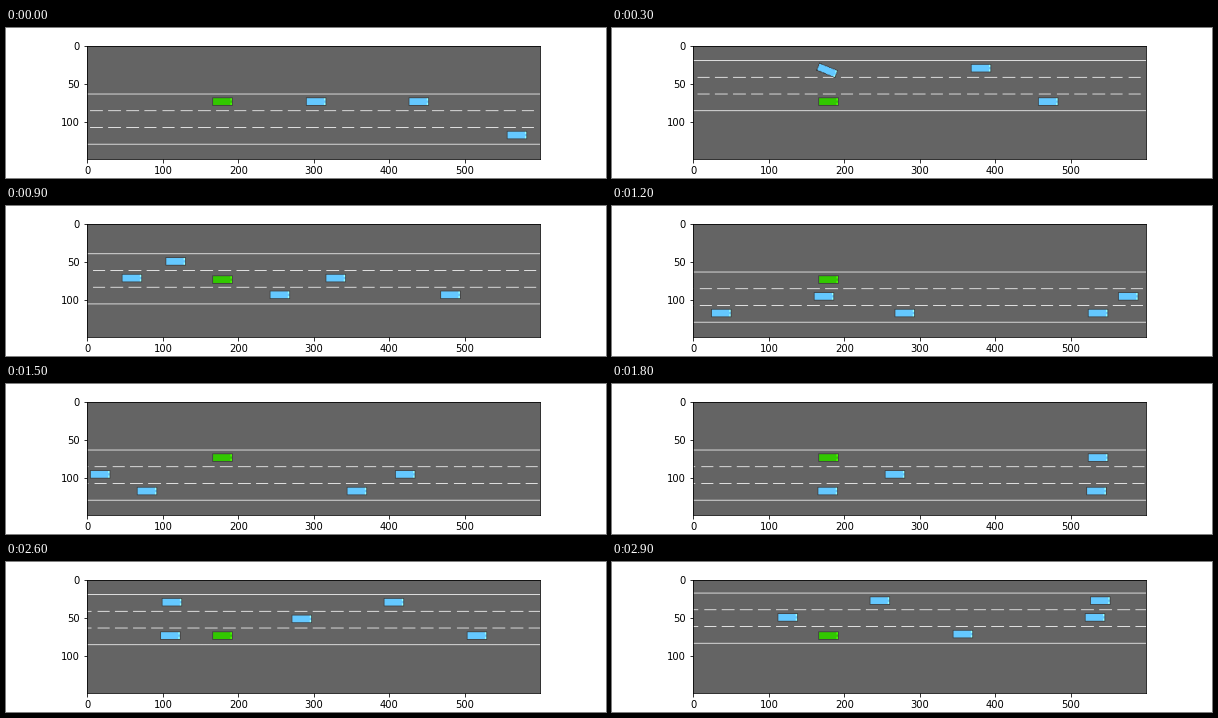
A matplotlib script for the animation above (3000 ms loop, 600 by 150 pixels).

```python
import numpy as np
import matplotlib.pyplot as plt
from matplotlib.animation import FuncAnimation

W, H, DPI = 600, 150, 72
FRAMES, INTERVAL = 30, 100

GREY, WHITE, EDGE = (100, 100, 100), (255, 255, 255), (60, 60, 60)
GREEN, BLUE = (50, 200, 0), (100, 200, 255)

LANE = 22                     # lane width in road pixels
PITCH, DASH, DRIFT = 23.8, 16.5, 0.35
EGO_X, EGO_Y = 180, 75

# Lane changes of the green car: time of the turn, lane it settles in
EGO_TURNS = [(0, 1), (1, 2), (8, 1), (9, 0), (21, 1.05), (25, 2.1)]

gy, gx = np.mgrid[0:H, 0:W] + 0.5


class Car:
    """Traffic that falls back at a steady speed relative to the green car."""

    def __init__(self, lane, t, x, speed=53, before=None, turn=None):
        self.lane, self.t, self.x = lane, t, x
        self.speed = speed
        self.before = speed if before is None else before
        self.turn = turn      # (start time, new lane)

    def pose(self, t):
        dt = t - self.t
        x = self.x - dt * (self.speed if dt > 0 else self.before)
        if self.turn is None:
            return x, self.lane, 0
        start, goal = self.turn
        u = np.clip((t - start) / 2.4, 0, 1)
        step = goal - self.lane
        return x, self.lane + step * u * u * (3 - 2 * u), step * 118 * u * (1 - u)


CARS = [
    Car(0, 3, 178, 42, turn=(2.4, 1)),
    Car(0, 3, 382, 44, before=19.5),
    Car(2, 3, 471, 68.5, before=33, turn=(4.5, 1)),
    Car(2, 9, 256, 72.5),
    Car(1, 9, 330, 52),
    Car(2, 9, 482, 67),
    Car(2, 12, 537, 59.6),
    Car(1, 12, 577, 51.5),
    Car(0, 22, 325),
    Car(2, 22, 323),
    Car(1, 22, 497),
    Car(0, 29, 248),
    Car(2, 29, 358),
    Car(0, 29, 540),
    Car(1, 29, 533),
]


def ego_lane(t):
    """Lane position: each turn decays exponentially to its new lane."""
    lane, last, goal = 0, 0, 0
    for start, new_goal in EGO_TURNS + [(FRAMES, 0)]:
        now = min(t, start)
        lane = goal + (lane - goal) * np.exp(-2.4 * (now - last))
        if t <= start:
            return lane
        last, goal = start, new_goal


def lighten(color):
    return [min(int(c / 0.68), 255) for c in color]


def draw_car(img, x, y, color, tilt=0):
    if not -20 < x < W + 20:
        return
    a = np.radians(tilt)
    dx, dy = gx - int(x), gy - round(y)
    u = dx * np.cos(a) + dy * np.sin(a)
    v = dy * np.cos(a) - dx * np.sin(a)

    def fill(u0, v0, u1, v1, c):
        img[(u >= u0) & (u < u1) & (v >= v0) & (v < v1)] = c

    fill(-14, -6, 13, 5, EDGE)
    fill(-13, -5, 12, 4, color)
    for v0 in (-5, 1):
        fill(10, v0, 12, v0 + 3, lighten(color))


def draw_road(img, top, phase):
    dashed = (np.arange(W) - phase) % PITCH < DASH
    img[[top, top + 3 * LANE]] = WHITE
    for y in (top + LANE, top + 2 * LANE):
        img[y, dashed] = WHITE


def scene(t):
    img = np.full((H, W, 3), GREY, dtype=np.uint8)
    lane0 = EGO_Y - round(LANE * ego_lane(t))
    draw_road(img, lane0 - LANE // 2, 4 + DRIFT * t)
    for car in CARS:
        x, lane, tilt = car.pose(t)
        draw_car(img, x, lane0 + LANE * lane, BLUE, tilt)
    draw_car(img, EGO_X, EGO_Y, GREEN)
    return img


plt.rcParams.update({"font.family": "DejaVu Sans", "font.size": 10})
fig, ax = plt.subplots(figsize=(W / DPI, H / DPI), dpi=DPI)
fig.subplots_adjust(left=0.125, right=0.9, bottom=0.125, top=0.88)
view = ax.imshow(scene(0))
ax.set_xticks(range(0, W, 100))
ax.set_yticks(range(0, H, 50))


def update(i):
    view.set_data(scene(i))
    return [view]


anim = FuncAnimation(fig, update, frames=FRAMES, interval=INTERVAL,
                     repeat=True, repeat_delay=0)
plt.show()
```
